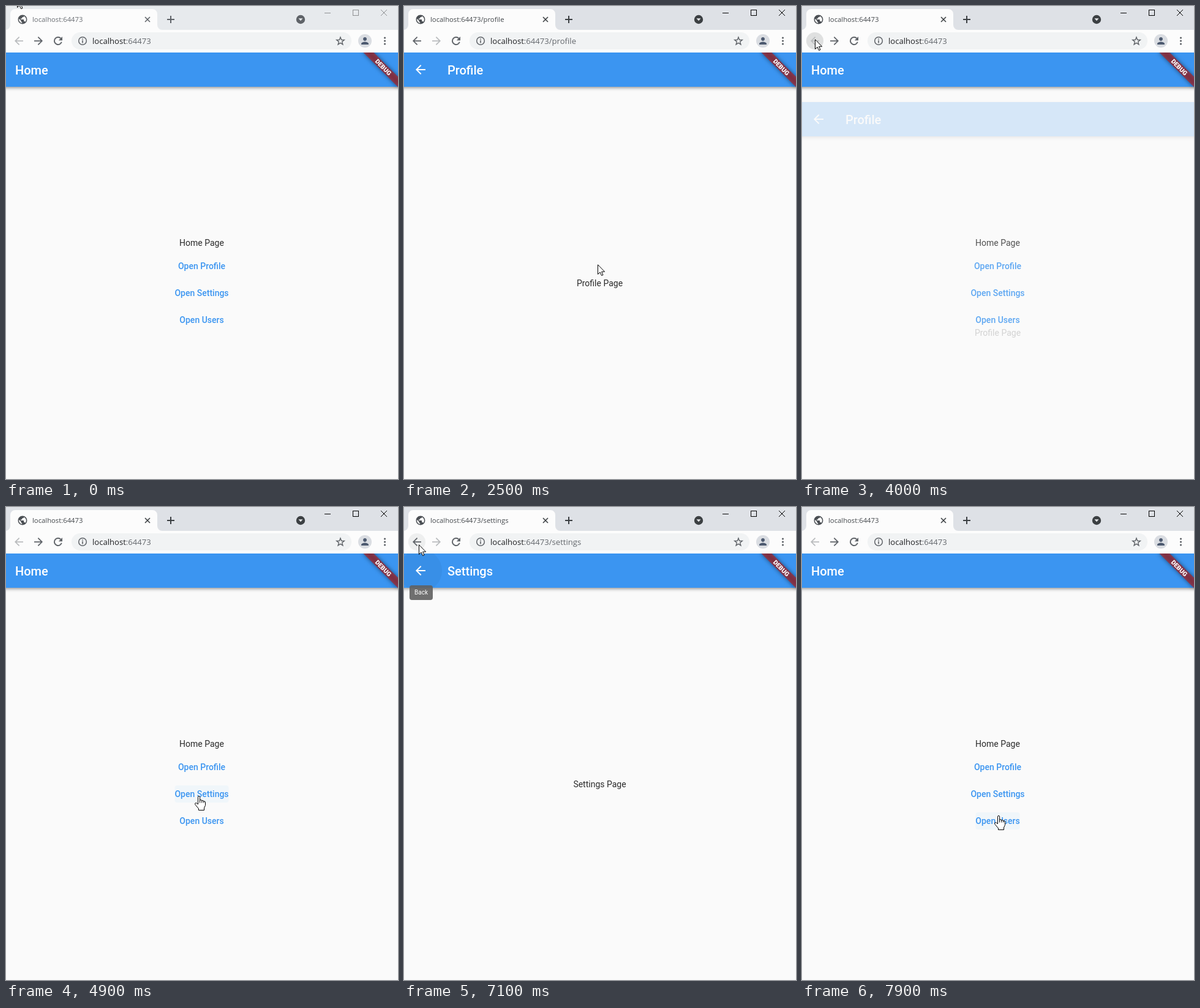
These frames come from a looping animation (640x773 px, 8000 ms). An HTML page with a canvas:

```html
<!DOCTYPE html>
<html lang="en">
<head>
<meta charset="utf-8">
<title>Page navigation</title>
<style>
html, body { margin: 0; width: 100%; height: 100%; overflow: hidden; background: #fafafa; }
canvas { display: block; }
</style>
</head>
<body>
<canvas id="stage" width="640" height="773"></canvas>
<script>
const W = 640, H = 773, TOP = 76, BAR = 56, MID = 319.5;
const LOOP = 8000, STEP = 100;
const BLUE = '#3b95f1', PAPER = '#fafafa', CHROME = '#fcfcfc', GREY = '#5f6368';
const UI = '"Open Sans", "Noto Sans", sans-serif', APP = 'Roboto, sans-serif';

const stage = document.getElementById('stage').getContext('2d');
const layer = document.createElement('canvas');
layer.width = W;
layer.height = H;
const layerCtx = layer.getContext('2d');

const BUTTONS = [['Open Profile', 425], ['Open Settings', 469], ['Open Users', 513]];

// time, address path, page on top, its transition progress
const ROUTES = [
  [0, '', '', 0],
  [1900, 'profile', 'Profile', .1], [2000, 'profile', 'Profile', .45], [2100, 'profile', 'Profile', 1],
  [3900, '', 'Profile', .7], [4000, '', 'Profile', .365], [4200, '', '', 0],
  [5700, 'settings', 'Settings', .02], [5800, 'settings', 'Settings', .28],
  [6000, 'settings', 'Settings', .615], [6100, 'settings', 'Settings', .95], [6200, 'settings', 'Settings', 1],
  [7300, '', 'Settings', .7], [7400, '', 'Settings', .365], [7500, '', '', 0]
];

// time, x, y of the pointer tip
const MOVES = [
  [0, 18, -14], [100, 18, -14], [1000, 308, 427], [1100, 308, 427], [1200, 310, 429],
  [1300, 310, 429], [1500, 317, 427], [2400, 317, 427], [2500, 316, 422], [2800, 118, 206],
  [2900, 118, 206], [3600, 21, 52], [3700, 21, 52], [3800, 21, 54], [4100, 21, 54],
  [4900, 314, 472], [6000, 314, 472], [6500, 30, 104], [6700, 24, 47], [6800, 22, 57],
  [6900, 24, 61], [7400, 24, 61], [7900, 320, 504], [8000, 320, 504]
];

const ARROW = new Path2D('M20 11H7.83l5.59-5.59L12 4l-8 8 8 8 1.41-1.41L7.83 13H20v-2z');
const GLOBE = new Path2D('M12 2C6.48 2 2 6.48 2 12s4.48 10 10 10 10-4.48 10-10S17.52 2 12 2zm-1 17.93c-3.95-.49-7-3.85-7-7.93 0-.62.08-1.21.21-1.79L9 15v1c0 1.1.9 2 2 2v1.93zm6.9-2.54c-.26-.81-1-1.39-1.9-1.39h-1v-3c0-.55-.45-1-1-1H8v-2h2c.55 0 1-.45 1-1V7h2c1.1 0 2-.9 2-2v-.41c2.93 1.19 5 4.06 5 7.41 0 2.08-.8 3.97-2.1 5.39z');
const PERSON = new Path2D('M12 12c2.21 0 4-1.79 4-4s-1.79-4-4-4-4 1.79-4 4 1.79 4 4 4zm0 2c-2.67 0-8 1.34-8 4v2h16v-2c0-2.66-5.33-4-8-4z');
const POINTER = new Path2D('M.5 .8V16.4L4.1 13L6.6 18.5L9 17.5L6.6 12.2H11.6Z');
const HAND = new Path2D('M5.5 14V2.2Q5.5 .5 7 .5Q8.6 .5 8.6 2.2V7Q11.6 5.8 11.8 8Q14.5 6.8 14.8 9Q17.5 8.2 17.5 11V15.5L15.5 20V23.5H6.5V21L1 14.5Q-.3 12 2 11.5Q3.6 11.5 5.5 14Z');
const KNUCKLES = new Path2D('M8.6 7V11.5M11.8 8V11.5M14.8 9V11.5');

function bezier(x1, y1, x2, y2) {
  const at = (a, b, s) => 3 * (1 - s) ** 2 * s * a + 3 * (1 - s) * s * s * b + s ** 3;
  return x => {
    let lo = 0, hi = 1;
    for (let i = 0; i < 24; i++) {
      const s = (lo + hi) / 2;
      if (at(x1, x2, s) < x) lo = s; else hi = s;
    }
    return at(y1, y2, lo);
  };
}
const slideEase = bezier(.4, 0, .2, 1);
const fadeEase = bezier(.42, 0, 1, 1);
const moveEase = bezier(.35, .1, .6, 1);

const within = (t, from, to) => t >= from && t < to;

function pointerAt(t) {
  const i = MOVES.findIndex(m => m[0] > t);
  const [t0, x0, y0] = MOVES[i - 1], [t1, x1, y1] = MOVES[i];
  const k = moveEase((t - t0) / (t1 - t0));
  return { x: Math.round(x0 + (x1 - x0) * k), y: Math.round(y0 + (y1 - y0) * k) };
}

function text(c, str, x, y, font, color, align = 'left') {
  c.font = font;
  c.fillStyle = color;
  c.textAlign = align;
  c.fillText(str, x, y);
  return c.measureText(str).width;
}

function disc(c, x, y, r, color) {
  c.fillStyle = color;
  c.beginPath();
  c.arc(x, y, r, 0, 7);
  c.fill();
}

function box(c, x, y, w, h, r, color) {
  c.fillStyle = color;
  c.beginPath();
  c.roundRect(x, y, w, h, r);
  c.fill();
}

function line(c, points, color, width) {
  c.strokeStyle = color;
  c.lineWidth = width;
  c.beginPath();
  for (const [x0, y0, x1, y1] of points) {
    c.moveTo(x0, y0);
    c.lineTo(x1, y1);
  }
  c.stroke();
}

// 24-unit icon centred on x, y
function icon(c, path, x, y, scale, color, flip = 1) {
  c.save();
  c.translate(x, y);
  c.scale(scale * flip, scale);
  c.translate(-12, -12);
  c.fillStyle = color;
  c.fill(path);
  c.restore();
}

function cross(c, x, y, r, color, width) {
  line(c, [[x - r, y - r, x + r, y + r], [x - r, y + r, x + r, y - r]], color, width);
}

function drawTabs(c, path, active) {
  c.fillStyle = active ? '#dee1e6' : '#e7eaed';
  c.fillRect(0, 0, W, 39);
  c.fillStyle = CHROME;
  c.fillRect(0, 39, W, TOP - 39);
  c.beginPath();
  c.moveTo(-1, 39);
  c.arcTo(7, 39, 7, 31, 8);
  c.arcTo(7, 5, 15, 5, 8);
  c.arcTo(247, 5, 247, 13, 8);
  c.arcTo(247, 39, 255, 39, 8);
  c.lineTo(255, 39);
  c.fill();

  const ink = active ? '#3c4043' : '#5f6368';
  icon(c, GLOBE, 27, 22, .74, active ? '#4a4e53' : '#505458');
  text(c, 'localhost:64473' + path, 43, 26, '11.27px ' + UI, active ? '#45494d' : '#6b6f74');
  cross(c, 231, 22, 4, ink, 1.6);
  line(c, [[263, 22, 275, 22], [269, 16, 269, 28]], ink, 2);

  disc(c, 481, 22, 7.2, ink);
  c.fillStyle = '#e8eaed';
  c.beginPath();
  c.moveTo(477.5, 20.3);
  c.lineTo(484.5, 20.3);
  c.lineTo(481, 24.3);
  c.fill();

  const ctl = active ? '#000' : '#8f9193';
  line(c, [[520, 11.5, 530, 11.5]], ctl, 1);
  c.strokeRect(566.5, 6.5, 9, 9);
  cross(c, 617, 11, 5, ctl, 1);
}

function drawToolbar(c, path, hover) {
  if (hover) disc(c, 21, 57, 14, `rgba(60,64,67,${hover})`);
  const faint = '#babcbe';
  icon(c, ARROW, 21, 57, .875, path ? GREY : faint);
  icon(c, ARROW, 53, 57, .875, path ? faint : GREY, -1);

  c.strokeStyle = GREY;
  c.lineWidth = 1.9;
  c.beginPath();
  c.arc(85, 57, 6, .3, -.75);
  c.stroke();
  c.fillStyle = GREY;
  c.beginPath();
  c.moveTo(92, 50);
  c.lineTo(92, 56.2);
  c.lineTo(85.8, 56.2);
  c.fill();

  box(c, 107, 43, 457, 28, 14, '#f1f3f4');
  c.strokeStyle = GREY;
  c.lineWidth = 1.5;
  c.beginPath();
  c.arc(125, 57, 6.3, 0, 7);
  c.stroke();
  c.fillStyle = GREY;
  c.fillRect(124.2, 56, 1.6, 4.5);
  c.fillRect(124.2, 53.3, 1.6, 1.6);

  const font = '13.1px ' + UI;
  const hostWidth = text(c, 'localhost', 141, 62, font, '#202124');
  text(c, ':64473' + path, 141 + hostWidth, 62, font, '#64686d');

  c.strokeStyle = GREY;
  c.lineWidth = 1.4;
  c.beginPath();
  for (let i = 0; i < 10; i++) {
    const a = i * Math.PI / 5 - Math.PI / 2, r = i % 2 ? 2.8 : 6.6;
    c.lineTo(546 + r * Math.cos(a), 57.5 + r * Math.sin(a));
  }
  c.closePath();
  c.stroke();

  disc(c, 586, 57, 11, '#dadde2');
  icon(c, PERSON, 586, 57, .74, '#4d5a70');
  for (const y of [52, 57, 62]) disc(c, 618.5, y, 1.6, GREY);
}

function drawScaffold(c, title, titleX) {
  c.fillStyle = PAPER;
  c.fillRect(0, TOP, W, H - TOP);
  c.save();
  c.shadowColor = 'rgba(0,0,0,.4)';
  c.shadowBlur = 5;
  c.shadowOffsetY = 2;
  c.fillStyle = BLUE;
  c.fillRect(-10, TOP, W + 20, BAR);
  c.restore();
  text(c, title, titleX, 112, '500 20px ' + APP, '#fff');
}

function drawHome(c, hovered, tint) {
  drawScaffold(c, 'Home', 15);
  text(c, 'Home Page', MID, 392, '14px ' + APP, '#2a2a2a', 'center');
  for (const [label, y] of BUTTONS) {
    c.font = '500 14px ' + APP;
    const w = c.measureText(label).width;
    if (label === hovered) box(c, MID - w / 2, y - 14, w, 28, 4, `rgba(33,150,243,${tint})`);
    text(c, label, MID, y + 5, c.font, BLUE, 'center');
  }
}

function drawDetail(c, name, splash) {
  drawScaffold(c, name, 71);
  if (splash) {
    c.save();
    c.beginPath();
    c.rect(0, TOP, W, BAR);
    c.clip();
    disc(c, 27, 104, 35, 'rgba(0,0,0,.045)');
    c.restore();
  }
  icon(c, ARROW, 27, 104, 1, '#fff');
  text(c, name + ' Page', MID, 458, '14px ' + APP, '#2a2a2a', 'center');
}

function drawBanner(c) {
  c.save();
  c.translate(W, TOP);
  c.rotate(Math.PI / 4);
  c.filter = 'blur(3.5px)';
  c.fillStyle = 'rgba(0,0,0,.5)';
  c.fillRect(-40, 28, 80, 12);
  c.filter = 'none';
  c.fillStyle = 'rgba(183,28,28,.627)';
  c.fillRect(-40, 28, 80, 12);
  text(c, 'DEBUG', 0, 37.6, '900 10.2px ' + APP, '#fff', 'center');
  c.restore();
}

function drawPointer(c, p, hand) {
  c.save();
  c.translate(p.x - (hand ? 6 : 0), p.y);
  c.fillStyle = '#fff';
  c.strokeStyle = '#000';
  c.lineWidth = 1;
  c.fill(hand ? HAND : POINTER);
  c.stroke(hand ? HAND : POINTER);
  if (hand) c.stroke(KNUCKLES);
  c.restore();
}

function buttonUnder(p) {
  const hit = BUTTONS.find(([, y]) => Math.abs(p.x - MID) < 40 && Math.abs(p.y - y) <= 14);
  return hit && hit[0];
}

function backHover(t) {
  if (within(t, 3900, 4300) || within(t, 7200, 7500)) return .15;
  return within(t, 3800, 3900) || within(t, 7100, 7200) ? .07 : 0;
}

function draw(t) {
  const c = stage;
  const [, url, page, progress] = ROUTES.filter(r => r[0] <= t).pop();
  const path = url && '/' + url;
  const active = t >= 1800;
  const pointer = pointerAt(t);
  const over = buttonUnder(pointer);

  c.save();
  c.beginPath();
  c.rect(0, TOP, W, H - TOP);
  c.clip();
  drawHome(c, active && over, url ? .16 : .045);
  if (page) {
    layerCtx.clearRect(0, 0, W, H);
    drawDetail(layerCtx, page, within(t, 6500, 7500));
    c.globalAlpha = fadeEase(progress);
    c.drawImage(layer, 0, Math.round((1 - slideEase(progress)) * (H - TOP) / 4));
    c.globalAlpha = 1;
  }
  if (within(t, 6600, 7300)) {
    box(c, 9, 128, 38, 24, 4, 'rgba(97,97,97,.9)');
    text(c, 'Back', 28, 143, '10px ' + APP, '#fff', 'center');
  }
  drawBanner(c);
  c.restore();

  drawTabs(c, path, active);
  drawToolbar(c, path, backHover(t));
  drawPointer(c, pointer, !url && over);
}

const start = performance.now();
function tick() {
  const t = (performance.now() - start) % LOOP;
  draw(Math.floor(t / STEP) * STEP);
  requestAnimationFrame(tick);
}
tick();
</script>
</body>
</html>
```
